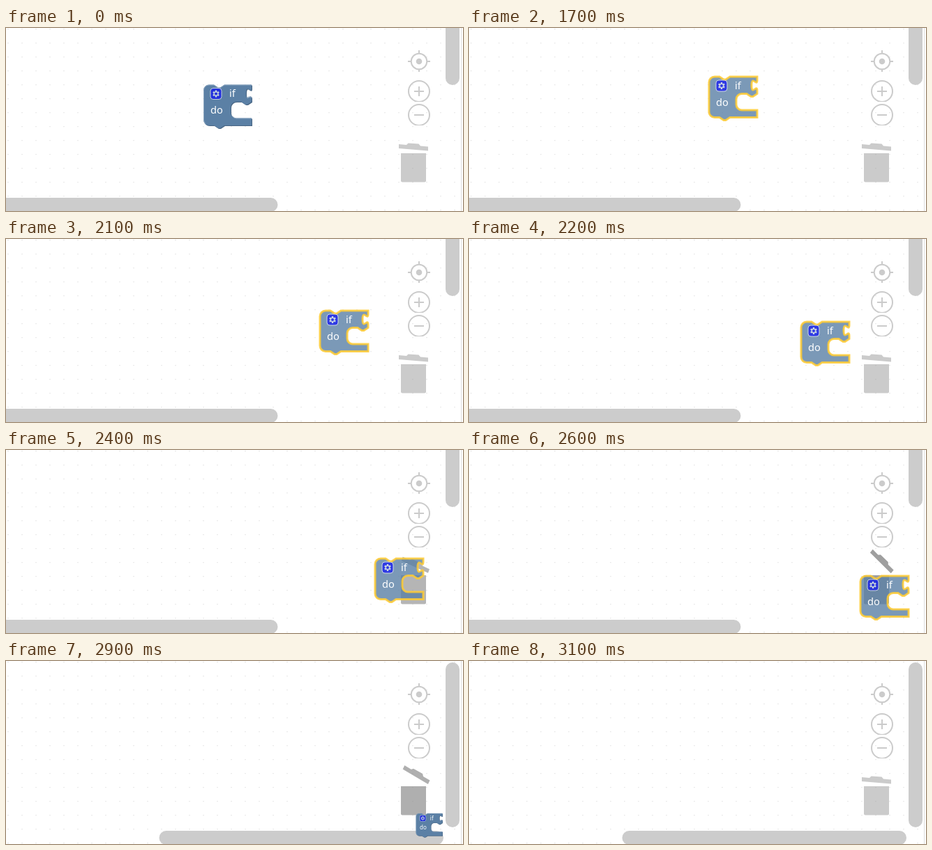
An HTML page that plays this animation: 655 px wide and 263 px high, repeating every 4800 ms.

```html
<!DOCTYPE html>
<html lang="en">
<head>
<meta charset="utf-8">
<title>Drag a block to the bin</title>
<style>
  html, body { margin: 0; width: 100%; height: 100%; overflow: hidden; background: #fff; }
  svg { display: block; width: 655px; height: 263px; }
  text { font: 14.67px "Noto Sans", "Open Sans", sans-serif; fill: #fff; }
  .bar { fill: #ccc; }
  .control { fill: none; stroke: #cbcbcb; stroke-width: 2; }
  .body { fill: #5b80a5; }
  .dark { fill: #496684; }
  .light { fill: none; stroke: #8ca6c0; stroke-width: 1; stroke-linecap: round; }
  .icon { opacity: .62; }
  .blue { fill: #00f; stroke: #fff; stroke-width: 1; }
  .drag .body { fill-opacity: .8; stroke: #fc3; stroke-width: 3; stroke-opacity: .85; }
  .drag .dark, .drag .light { display: none; }
</style>
</head>
<body>
<svg viewBox="0 0 655 263">
  <defs>
    <pattern id="grid" width="20" height="20" patternUnits="userSpaceOnUse">
      <rect x="2.5" y="1.2" width="1" height="1" fill="#ccc"/>
    </pattern>
    <clipPath id="zoomClip"><path d="M576,74h32v32h-32zM576,108h32v32h-32z"/></clipPath>
    <path id="outline" d="M0,8 a8,8 0 0 1 8,-8 H15 l6,4 3,0 6,-4 H69 v5
      c0,10 -8,-8 -8,7.5 s8,-2.5 8,7.5 V24.5 l-6,4 -3,0 -6,-4 h-7
      a8,8 0 0 0 -8,8 v7.5 a8,8 0 0 0 8,8 H69 V58.5 H30 l-6,4 -3,0 -6,-4 H8
      a8,8 0 0 1 -8,-8 z"/>
  </defs>

  <rect width="652" height="263" fill="url(#grid)"/>
  <rect x="652" width="1" height="263" fill="#ddd"/>

  <rect id="barH" class="bar" y="244" height="20" rx="10"/>
  <rect id="barV" class="bar" x="630" width="20" rx="10"/>

  <g class="control">
    <circle cx="592" cy="48" r="11.3"/>
    <path d="M592,32v5M592,59v4M576,48h5M603,48h5"/>
    <circle cx="592" cy="48" r="4.3" fill="#cbcbcb" stroke="none"/>
    <g clip-path="url(#zoomClip)">
      <circle cx="592" cy="91" r="15"/>
      <path d="M585,91h14M592,84v14"/>
      <circle cx="592" cy="125" r="15"/>
      <path d="M585,125h14"/>
    </g>
  </g>

  <g id="bin" fill="#888">
    <path d="M566,180h36v39.5q0,2 -2,2h-32q-2,0 -2,-2z"/>
    <path id="lid" d="M563,167 L574,168 L576.5,165.6 L591.5,166.6 L594,169.6 L605,170.5 V176.5 L563,173z"/>
  </g>

  <g id="block">
    <use href="#outline" class="dark" x="1" y="1"/>
    <use href="#outline" class="body"/>
    <path class="light" d="M2.8,55.8 A7.5,7.5 0 0 1 .5,50.5 V8 A7.5,7.5 0 0 1 8,.5 H15 l6,4 3,0 6,-4 H68.5
      M63,18 q3,-1.5 5.5,0 M41.5,45.5 A8.5,8.5 0 0 0 47,48.5 H68.5"/>
    <g class="icon" transform="translate(18 13)">
      <rect class="blue" x="-8" y="-8" width="16" height="16" rx="4"/>
      <path id="gear" fill="#fff"/>
      <circle class="blue" r="2.5"/>
    </g>
    <text x="37" y="17.5">if</text>
    <text x="10" y="41.5">do</text>
  </g>
</svg>
<script>
const LOOP = 4800, STEP = 100;
const DRAG_START = 1700, DRAG_END = 2900;
const HOME = [283, 81.5];
// Block position at each step of the drag.
const TRAIL = [
  [344, 70], [371, 71], [397, 77], [424, 88], [450, 103], [476, 119],
  [503, 138], [529, 156], [548, 170], [561, 181], [569, 188], [572, 191]
];
const OPEN_ANGLE = 40;
const el = id => document.getElementById(id);
const set = (id, attrs) => {
  for (const name in attrs) el(id).setAttribute(name, attrs[name]);
};

function gearPath(teeth) {
  const points = [];
  const add = (r, a) => points.push([r * Math.cos(a), r * Math.sin(a)].map(v => v.toFixed(2)));
  for (let i = 0; i < teeth; i++) {
    const a = (i + .5) * 2 * Math.PI / teeth;
    add(3.5, a - .38);
    add(5, a - .22);
    add(5, a + .22);
    add(3.5, a + .38);
  }
  return "M" + points.join("L") + "z";
}

// How far the bin is open, from 0 to 1.
function binOpen(t) {
  if (t < 2400 || t >= 3100) return 0;
  if (t < 2500) return .5;
  if (t < DRAG_END) return 1;
  return t < 3000 ? .65 : .2;
}

function placeBlock(t) {
  const dragging = t >= DRAG_START && t < DRAG_END;
  let [x, y] = HOME, scale = 1;
  if (dragging) {
    [x, y] = TRAIL[(t - DRAG_START) / STEP];
  } else if (t >= DRAG_END) {
    const gone = Math.min(1, .45 + (t - DRAG_END) / 150);
    [x, y] = TRAIL[TRAIL.length - 1];
    x += 69 * gone / 2;
    y += 62 * gone;
    scale = 1 - gone;
  }
  set("block", {
    transform: `translate(${x} ${y}) scale(${scale})`,
    class: dragging ? "drag" : "",
    visibility: scale > 0 ? "visible" : "hidden"
  });
}

function draw(time) {
  const t = Math.floor(time % LOOP / STEP) * STEP;
  const empty = t >= DRAG_END;
  const open = binOpen(t);
  placeBlock(t);
  set("bin", { opacity: .43 + .37 * open });
  set("lid", { transform: `rotate(${OPEN_ANGLE * open} 604 176.5)` });
  set("barH", empty ? { x: 219.5, width: 407.5 } : { x: -20, width: 409.5 });
  set("barV", empty ? { y: 2, height: 237 } : { y: -20, height: 102 });
}

set("gear", { d: gearPath(6) });
const start = performance.now();
function tick() {
  draw(performance.now() - start);
  requestAnimationFrame(tick);
}
tick();
</script>
</body>
</html>
```
